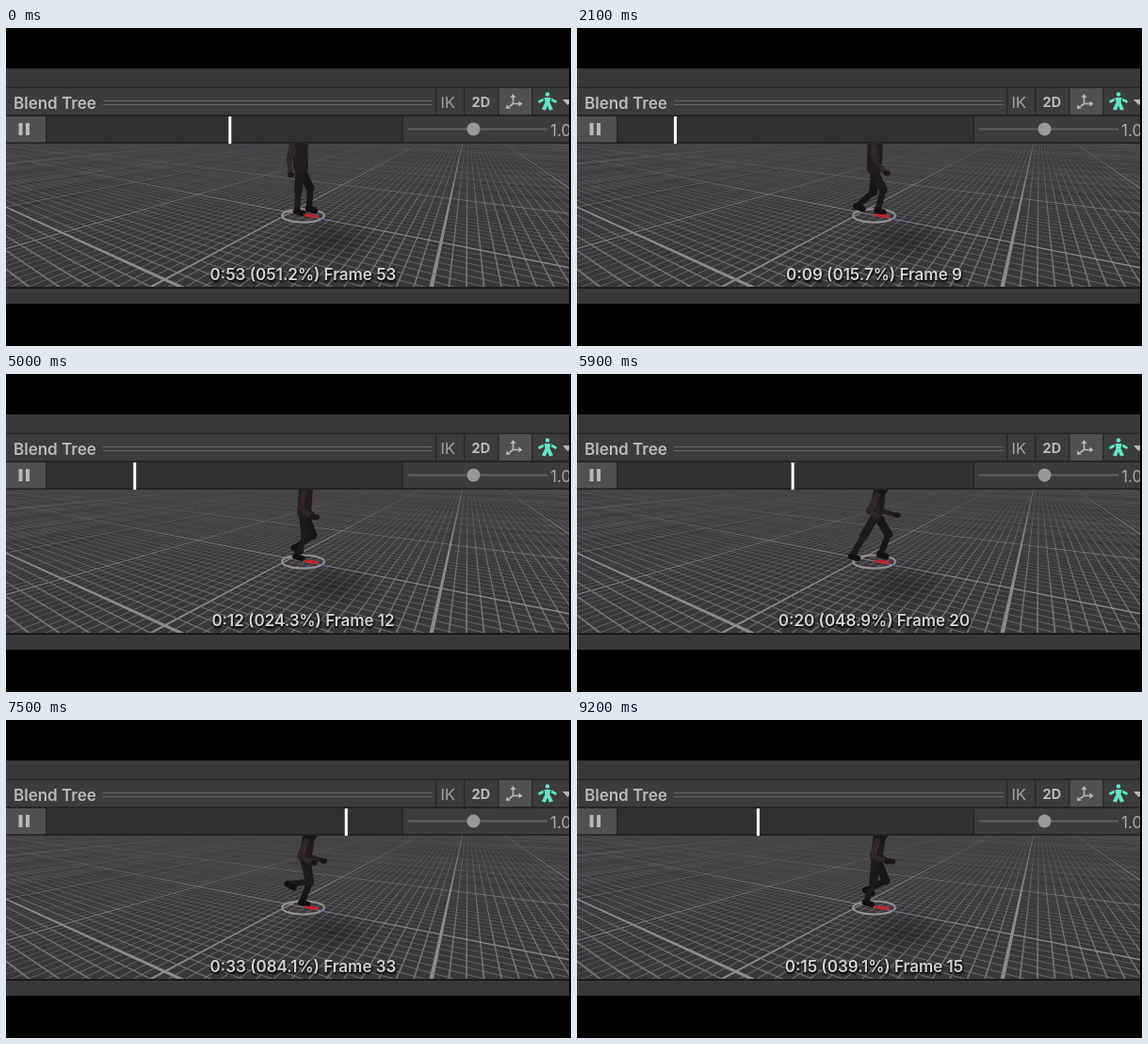
These frames come from a looping animation (600 by 338 pixels, 9.3 s). An HTML page with a canvas:

```html
<!DOCTYPE html>
<html lang="en">
<head>
<meta charset="utf-8">
<title>Blend Tree preview</title>
<style>
html, body { margin: 0; width: 100%; height: 100%; overflow: hidden; background: #000; }
#stage { position: relative; width: 600px; height: 338px; overflow: hidden; font-family: Inter, sans-serif; }
#stage > * { position: absolute; left: 0; top: 0; }
#view { top: 123px; }
#info {
  left: 115.5px; top: 250.5px; width: 400px; text-align: center; white-space: pre;
  font-size: 17px; font-weight: 600; line-height: 22px; color: #d2d2d2;
  text-shadow: 0 1px 2px #000, 1px 2px 3px #000;
}
svg text { font-family: Inter, sans-serif; font-size: 17px; fill: #bababa; }
</style>
</head>
<body>
<div id="stage">
  <svg width="600" height="338" viewBox="0 0 600 338">
    <path fill="#383838" d="M0 43H598V63H0zM0 277H598V293H0z"/>
    <path fill="#262626" d="M0 62.500H598V64H0zM0 92H598V94H0zM0 121.500H598V123H0zM0 275H598V276.500H0z"/>
    <path fill="#3c3c3c" d="M0 64H598V92H0zM422 94H598V121.500H422z"/>
    <path fill="#505050" d="M523 64H558V92H523zM0 94H42V121.500H0z"/>
    <path fill="#323132" d="M43 94H421V121.500H43z"/>
    <path fill="#282828" d="M456 64h1.500v28h-1.500zM486 64h1.500v28h-1.500zM522 64h1.500v28h-1.500zM558 64h1.500v28h-1.500zM42 94h1.500v27h-1.500zM420.500 94h1.500v27h-1.500z"/>
    <path stroke="#666" stroke-width="1.200" d="M103 77.500H453M103 81.500H453"/>
    <text x="8" y="85.500" font-weight="600">Blend Tree</text>
    <text x="461.500" y="85" style="fill:#a2a2a2;font-size:16.500px">IK</text>
    <text x="494.500" y="84" font-weight="700" style="font-size:14.500px">2D</text>
    <g fill="none" stroke="#b8b8b8" stroke-width="1.600">
      <path d="M538.500 73V80.500H545M538.500 80.500L534.500 83.500"/>
      <path fill="#b8b8b8" stroke="none" d="M535.500 74L538.500 70L541.500 74zM544.500 77.500L548.500 80.500L544.500 83.500zM531.500 81.500L531 86L536 85.500z"/>
    </g>
    <g fill="#62e6c6">
      <circle cx="575" cy="70.500" r="2.300"/>
      <path d="M571.500 74H578.500L577.500 79L581 86.500L577 87.500L575 82.500L573 87.500L569 86.500L572.500 79z"/>
      <path d="M570.500 74.500L571 77.500L566 80L565 77.500zM579.500 74.500L579 77.500L584 80L585 77.500z"/>
    </g>
    <path fill="#b8b8b8" d="M591 76H598V80.500L596.500 82zM13.500 101H17.500V114H13.500zM21 101H25V114H21z"/>
    <path stroke="#606060" stroke-width="2" d="M427 107.500H575"/>
    <circle cx="496.500" cy="107.500" r="7" fill="#999"/>
    <text x="578" y="114.500" style="fill:#aaa">1.0</text>
    <path fill="#000" d="M598 43H600V293H598z"/>
    <rect id="head" y="94" width="3" height="29" fill="#fff"/>
  </svg>
  <canvas id="view" width="598" height="152"></canvas>
  <div id="info"></div>
</div>
<script>
const LOOP = 9300, STEP = 100, TAU = 2 * Math.PI;
const el = id => document.getElementById(id);
const ctx = el('view').getContext('2d');

// [seconds, value]
const PHASE = [[0, .512], [.8, 1.009], [1.45, 1.535], [2.1, 2.157], [2.6, 2.658], [3.6, 3.701],
  [3.9, 4.014], [4.8, 5.012], [5, 5.243], [5.6, 6.041], [6.3, 7.086], [6.8, 7.791],
  [8.2, 9.89], [8.3, 10.06], [9.2, 11.391]];
const LENGTH = [[0, 104], [.8, 91], [2.1, 60], [2.6, 57.6], [3.7, 57.6], [5, 51], [6, 40], [9.3, 40]];
const WALK = [[0, 0], [1.6, .9], [2.6, 1]];
const RUN = [[3.7, 0], [5, .4], [6, 1]];
const OFFSET = [[2.1, .13], [3.6, -.02], [5, 0], [6, .14]];

const mix = (a, b, k) => a + (b - a) * k;
function at(keys, t) {
  if (t <= keys[0][0]) return keys[0][1];
  for (let i = 1; i < keys.length; i++) {
    const [t0, a] = keys[i - 1], [t1, b] = keys[i];
    if (t <= t1) return mix(a, b, (t - t0) / (t1 - t0));
  }
  return keys[keys.length - 1][1];
}

// Ground point to screen: camera yaw -120, pitch 20 degrees, unit distance.
function project(a, b) {
  const right = -.5 * a + .866 * b, ahead = -.866 * a - .5 * b;
  const k = 284 / (1 + .94 * ahead);
  return [316 + right * k, 199 - .342 * ahead * k];
}

function strip(c, along, pos, width) {
  const lo = pos - width / 2, hi = pos + width / 2, far = -60;
  const near = along ? (.85 - .5 * pos) / .866 : (.85 - .866 * pos) / .5;
  const pts = [[lo, far], [lo, near], [hi, near], [hi, far]];
  pts.forEach(([p, q], i) => {
    const [x, y] = along ? project(q, p) : project(p, q);
    i ? c.lineTo(x, y) : c.moveTo(x, y);
  });
  c.closePath();
}

function makeFloor() {
  const canvas = document.createElement('canvas');
  canvas.width = 598;
  canvas.height = 152;
  const c = canvas.getContext('2d');
  c.fillStyle = '#39373a';
  c.fillRect(0, 0, 598, 152);
  c.translate(0, -123);
  const cell = .523, parts = 16;
  for (const along of [true, false]) {
    const start = along ? .464 : 0;
    for (let i = -12 * parts; i < 5 * parts; i++) {
      const major = i % parts === 0;
      c.fillStyle = major ? '#8c8a8d' : '#737174';
      c.beginPath();
      strip(c, along, start + i * cell / parts, major ? .008 : .0034);
      c.fill();
    }
  }
  const haze = c.createLinearGradient(0, 123, 0, 190);
  haze.addColorStop(0, 'rgba(72,70,73,.45)');
  haze.addColorStop(1, 'rgba(72,70,73,0)');
  c.fillStyle = haze;
  c.fillRect(0, 123, 598, 67);

  c.translate(345, 226);
  c.scale(1, .45);
  const shade = c.createRadialGradient(0, 0, 0, 0, 0, 58);
  shade.addColorStop(0, 'rgba(20,18,20,.38)');
  shade.addColorStop(1, 'rgba(20,18,20,0)');
  c.fillStyle = shade;
  c.fillRect(-60, -60, 120, 120);
  return canvas;
}
const floor = makeFloor();

function limb(color, width, ...pts) {
  ctx.strokeStyle = color;
  ctx.lineWidth = width;
  ctx.beginPath();
  pts.forEach(p => ctx.lineTo(...p));
  ctx.stroke();
}

function knee([x0, y0], [x1, y1], len) {
  const dx = x1 - x0, dy = y1 - y0, d = Math.hypot(dx, dy);
  const bend = Math.sqrt(Math.max(0, len * len - d * d / 4));
  return [(x0 + x1) / 2 + dy / d * bend, (y0 + y1) / 2 - dx / d * bend];
}

function leg(q, side, hip, walk, run, color) {
  q -= Math.floor(q);
  const s = Math.max(0, q * 2 - 1);
  const lift = Math.sin(Math.PI * s) * (1 - s) ** 2.5;
  const reach = mix(12, 24, run);
  const x = mix(side ? 322 : 309, mix(308, 307, run) + reach * Math.cos(TAU * q), walk);
  const y = mix(side ? 192 : 195, 194 - lift * mix(32, 75, run), walk);
  const joint = knee(hip, [x, y], mix(21.5, 23, walk));
  limb(color, 9, hip, joint);
  limb(color, 6.5, joint, [x, y]);
  limb('#121013', 6.5, [x - 1, y], [x + 6, y + 2 + walk * lift * 7]);
}

function arm(swing, shoulder, walk, run, color) {
  const [x, y] = shoulder;
  const elbow = [x - mix(3, 5, run) + swing * 6 * walk, y + mix(19, 16, run)];
  const hand = [elbow[0] + mix(1, mix(9, 15, run), walk) + swing * 3 * walk,
    elbow[1] + mix(15, mix(13, 6, run), walk) - swing * 3 * run];
  limb(color, 6.5, shoulder, elbow);
  limb(color, 5, elbow, hand);
  limb('#19171a', 5.5, hand, [hand[0] + 1.5, hand[1]]);
}

function drawFigure(t, phase) {
  const walk = at(WALK, t), run = at(RUN, t);
  const q = phase - at(OFFSET, t), swing = Math.cos(TAU * q);
  const bob = walk * mix(.5, 1.5, run) * Math.cos(2 * TAU * q);
  const hip = [mix(312, mix(315, 317, run), walk), 151 + bob];
  const chest = [mix(312, mix(317, 321, run), walk), mix(116, 127, run) + bob];
  const shoulder = [chest[0] - mix(3, 1, walk), mix(122, 130, run) + bob];
  ctx.lineCap = ctx.lineJoin = 'round';
  arm(-swing, [shoulder[0] + mix(9, 4, walk), shoulder[1]], walk, run, '#241f21');
  leg(q + .5, 1, [hip[0] + 2, hip[1]], walk, run, '#171518');
  leg(q, 0, hip, walk, run, '#1d1a1d');
  limb('#201c1f', mix(16, 13, run), [hip[0] + 1, hip[1] - 3], chest);
  if (run > 0) limb('#181619', 11, chest, [chest[0] + 4, chest[1] - 4]);
  arm(swing, [shoulder[0] - mix(5, 1, walk), shoulder[1]], walk, run, '#2f2628');
  limb('#54292c', 1.3, [shoulder[0] - 2, shoulder[1] + 7], [shoulder[0] - 3, shoulder[1] + 13]);
}

function drawMarker() {
  ctx.strokeStyle = '#929092';
  ctx.lineWidth = 2;
  ctx.beginPath();
  ctx.ellipse(315.5, 199.5, 22.5, 7, 0, 0, TAU);
  ctx.stroke();
}

function drawArrow() {
  ctx.fillStyle = '#c4222b';
  ctx.beginPath();
  [[315, 197.5], [326, 198], [334, 200], [328, 202], [317, 200]].forEach(p => ctx.lineTo(...p));
  ctx.fill();
  limb('#56608f', 1.5, [335, 203], [341, 204.5]);
}

function render(ms) {
  const t = Math.floor(ms % LOOP / STEP) * STEP / 1000;
  const phase = at(PHASE, t) % 1;
  const frame = Math.floor(phase * at(LENGTH, t));
  const clock = Math.floor(frame / 60) + ':' + String(frame % 60).padStart(2, '0');
  const percent = (phase * 100).toFixed(1).padStart(5, '0');
  el('info').textContent = `${clock} (${percent}%) Frame ${frame}`;
  el('head').setAttribute('x', 43.9 + 375.8 * phase);

  ctx.setTransform(1, 0, 0, 1, 0, 0);
  ctx.drawImage(floor, 0, 0);
  ctx.translate(0, -123);
  drawMarker();
  drawFigure(t, phase);
  drawArrow();
}

const begin = performance.now();
function tick() {
  render(performance.now() - begin);
  requestAnimationFrame(tick);
}
tick();
</script>
</body>
</html>
```
